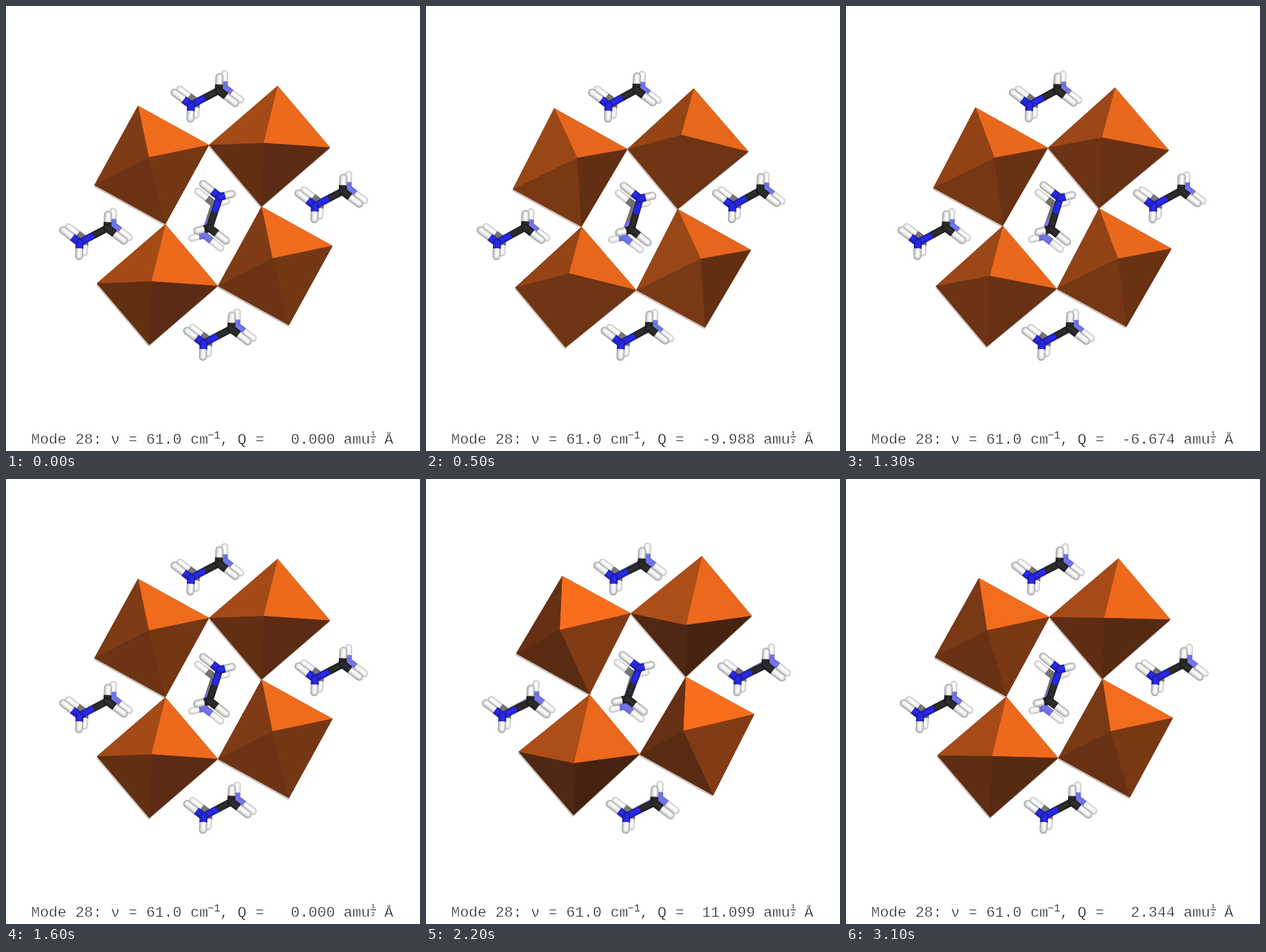
Recreate the animation shown at these times as an HTML page with a canvas. Size 628 px wide and 676 px high, loop 3200 ms.

```html
<!DOCTYPE html>
<html lang="en">
<head>
<meta charset="utf-8">
<title>Vibrational mode 28</title>
<style>
html, body { margin: 0; width: 100%; height: 100%; overflow: hidden; background: #fff; }
canvas { display: block; width: 628px; height: 676px; }
</style>
</head>
<body>
<canvas id="stage" width="628" height="676"></canvas>
<script>
const ctx = document.getElementById('stage').getContext('2d');
const STEP = 100, STEPS = 32, AMPLITUDE = 12.013;
const FONT = '"Liberation Mono", "Courier New", monospace';

// vectors
const add = (a, b, k = 1) => a.map((v, i) => v + b[i] * k);
const sub = (a, b) => add(a, b, -1);
const dot = (a, b) => a.reduce((sum, v, i) => sum + v * b[i], 0);
const unit = a => a.map(v => v / Math.hypot(...a));
const cross = (a, b) => [
  a[1] * b[2] - a[2] * b[1], a[2] * b[0] - a[0] * b[2], a[0] * b[1] - a[1] * b[0]
];
const rgb = c => `rgb(${c.map(v => Math.round(Math.min(255, v))).join()})`;

// Octahedra come in two orientations. Drifts are pixels per unit of Q.
const RADIUS = 92;
const odd = { across: [87, -30.5], down: [20.8, 90], apex: [-4.2, -11.4], apexDrift: [-1.25, -0.07] };
const even = { across: [91.8, 2], down: [-12.2, 91.7], apex: [-9.3, -5], apexDrift: [0.36, 1.23] };
const ACROSS_DRIFT = [0.24, -0.63], DOWN_DRIFT = [0.58, -0.38];
const LIGHTS = [[-0.1, -0.1, 1], [1, -2, 0.5]].map(unit);

// They share corners, so each centre follows from its neighbour.
const nw = sub([308, 211], odd.across);
const ne = add([308, 211], even.across);
const stepDown = add(odd.down, even.down);
const octahedra = [
  [odd, nw], [even, ne], [even, add(nw, stepDown)], [odd, add(ne, stepDown)]
];

// Molecules: the two ends carry the same arms, inverted.
const CELL = [[188, 153], [-169, 209]];
const edgeMolecule = {
  tail: [280.7, 150.5], bond: [42, -22], arms: [[-25, -19], [-1, 20.5]],
  back: [8, -5], drift: [0.38, 0], sway: [0, 0.12]
};
const middleMolecule = {
  tail: [324, 290], bond: [-15.5, 47], arms: [[-25, -19.5], [18.5, -4.5]],
  back: [-8, 11], drift: [-0.08, -0.27], sway: [-0.2, 0]
};
const COLOURS = { H: [250, 250, 250], C: [46, 46, 46], N: [42, 42, 238] };
const FOG = 0.35;
// stick width and brightness, from rim to highlight
const LAYERS = [[1, 0.64], [0.82, 0.8], [0.58, 0.92], [0.28, 1]];

function polygon(points, fill) {
  ctx.beginPath();
  points.forEach(p => ctx.lineTo(p[0], p[1]));
  ctx.closePath();
  ctx.fillStyle = fill;
  ctx.fill();
}

function facetColour(a, b, c) {
  const normal = unit(cross(sub(b, a), sub(c, a)));
  const light = LIGHTS.reduce((sum, l) => sum + 0.65 * Math.max(0, dot(normal, l)), 0);
  return rgb(add([10, 10, 13], [236, 99, 16], light));
}

function drawOctahedron([kind, home], q) {
  const centre = add(add(home, ACROSS_DRIFT, q / 2), DOWN_DRIFT, q / 2);
  const apex = add(add(home, kind.apex), kind.apexDrift, q);
  const tilt = sub(apex, centre);
  const height = Math.sqrt(RADIUS ** 2 - dot(tilt, tilt));
  const corner = (axis, sign, drift) => [
    ...add(add(home, axis, sign), drift, q), -sign * dot(axis, tilt) / height
  ];
  const rim = [
    corner(kind.down, -1, DOWN_DRIFT), corner(kind.across, 1, ACROSS_DRIFT),
    corner(kind.down, 1, DOWN_DRIFT), corner(kind.across, -1, ACROSS_DRIFT)
  ];

  // the hazy layer behind shows along the lower edges
  polygon(rim.map(([x, y]) => [x - 1, y + 2.5]), 'rgba(120, 95, 80, 0.4)');
  const tip = [...apex, height];
  polygon(rim, rgb([110, 54, 20]));
  rim.forEach((a, i) => {
    const b = rim[(i + 1) % 4];
    polygon([tip, a, b], facetColour(tip, a, b));
  });
}

function halfStick(end, mid, element, width, fog) {
  LAYERS.forEach(([size, glow]) => {
    const shift = (1 - size) * width * 0.08;
    const [a, b] = [end, mid].map(p => add(p, [shift, -shift]));
    const colour = COLOURS[element].map(v => v * glow * (1 - fog) + 255 * fog);
    ctx.strokeStyle = ctx.fillStyle = rgb(colour);
    ctx.lineWidth = width * size;
    ctx.beginPath();
    ctx.moveTo(...a);
    ctx.lineTo(...b);
    ctx.stroke();
    ctx.beginPath();
    ctx.arc(...a, width * size / 2, 0, 7);
    ctx.fill();
  });
}

function stick(a, b, from, to, width, fog, split = 0.5) {
  const mid = add(a, sub(b, a), split);
  halfStick(a, mid, from, width, fog);
  halfStick(b, mid, to, width, fog);
}

function drawIon(tail, head, arms, elements, fog) {
  const width = fog ? 11 : 12;
  stick(tail, head, ...elements, width - 1, fog);
  arms.forEach(arm => stick(tail, add(tail, arm), elements[0], 'H', width, fog, 0.45));
  [...arms].reverse().forEach(arm =>
    stick(head, sub(head, arm), elements[1], 'H', width, fog, 0.45));
}

function drawMolecule({ tail, bond, arms, back, drift, sway }, offset, q) {
  const front = add(add(tail, offset), drift, q);
  const rear = add(front, back);
  drawIon(rear, add(add(rear, bond), sway, -0.7 * q), arms, ['C', 'N'], FOG);
  drawIon(front, add(add(front, bond), sway, q), arms, ['N', 'C'], 0);
}

// A white outline thins the letters.
function write(text, x, y, size, thin = 0.7) {
  ctx.font = `${size}px ${FONT}`;
  ctx.fillStyle = '#000';
  ctx.fillText(text, x, y);
  ctx.strokeStyle = '#fff';
  ctx.lineWidth = thin;
  ctx.strokeText(text, x, y);
}

function drawCaption(q) {
  write('Mode 28: ν = 61.0 cm', 38, 664.5, 22.4);
  write('−1', 306, 657, 15.7, 0.3);
  write(', Q =' + q.toFixed(3).padStart(8), 324.5, 664.5, 22.4);
  write('amu', 512, 664.5, 22.4);
  write('1', 554, 651.5, 9.5, 0.1);
  write('2', 554, 663.5, 9.5, 0.1);
  ctx.fillRect(553, 654, 8, 1);
  write('Å', 574, 664.5, 22.4);
}

function draw(now) {
  const step = Math.floor(now / STEP) % STEPS;
  const q = step % (STEPS / 2) ? -AMPLITUDE * Math.sin(2 * Math.PI * step / STEPS) : 0;

  ctx.fillStyle = '#fff';
  ctx.fillRect(0, 0, 628, 676);
  octahedra.forEach(o => drawOctahedron(o, q));
  for (const i of [0, 1]) {
    for (const j of [0, 1]) {
      drawMolecule(edgeMolecule, add(CELL[0].map(v => v * i), CELL[1], j), q);
    }
  }
  drawMolecule(middleMolecule, [0, 0], q);
  drawCaption(q);
}

const start = performance.now();
function tick() {
  draw(performance.now() - start);
  requestAnimationFrame(tick);
}
tick();
</script>
</body>
</html>
```
